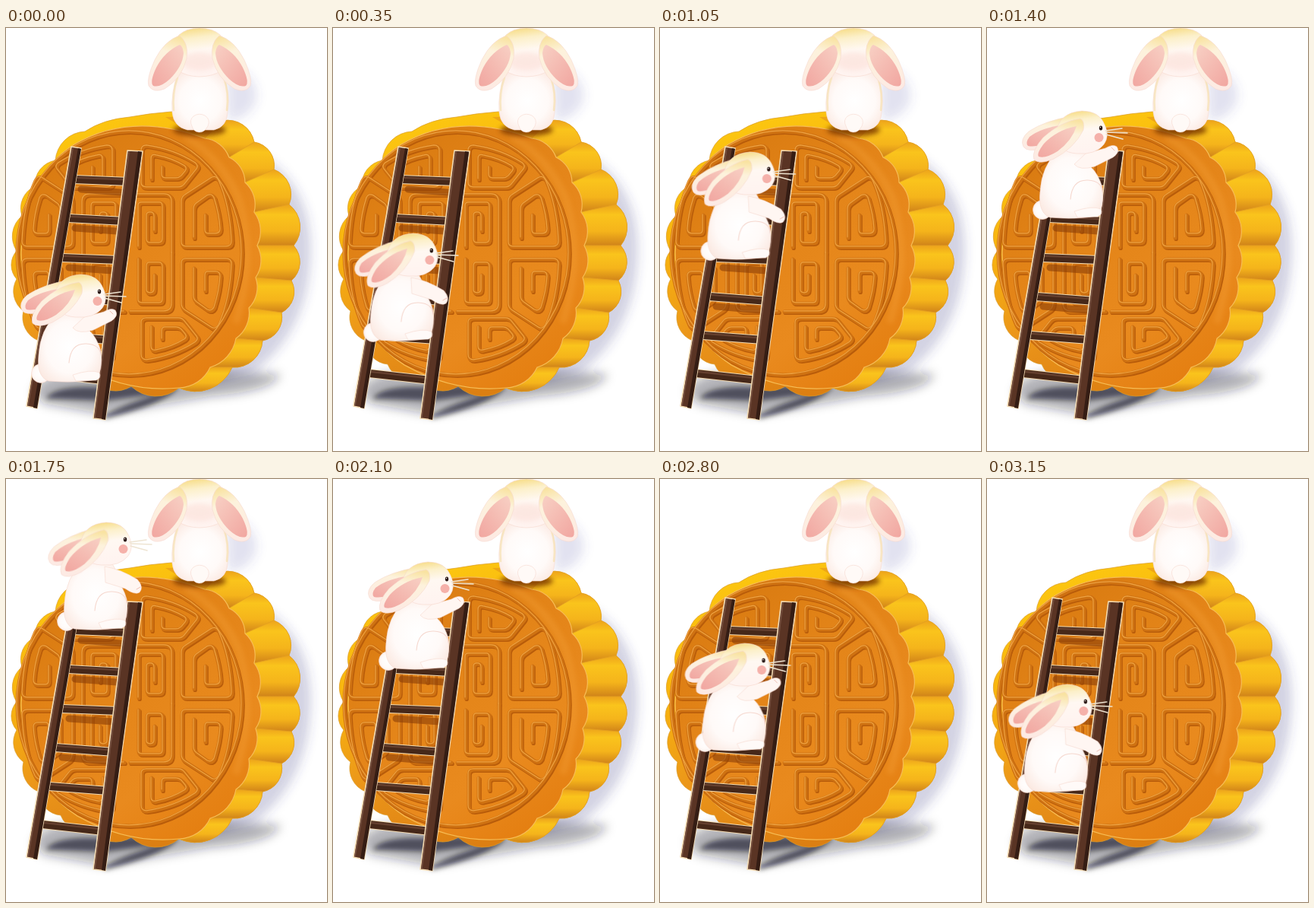
An HTML page that plays this animation: 423 px wide and 556 px high, repeating every 3.5 s.

```html
<!DOCTYPE html>
<html lang="en">
<head>
<meta charset="utf-8">
<title>Rabbit climbing a mooncake</title>
<style>
  html, body { margin: 0; width: 100%; height: 100%; overflow: hidden; background: #fff; }
  svg { display: block; width: 423px; height: 556px; }
  .line { fill: none; stroke-linecap: round; stroke-linejoin: round; }
  .fur { stroke: #f6d9ce; stroke-width: .6; }
  .climber { animation: climb 3500ms step-end infinite; }
  .reach { animation: reach 700ms step-end infinite; }
  .rest { animation: rest 700ms step-end infinite; }
  .ears { transform-origin: 90px 342px; animation: droop 700ms step-end infinite; }
  @keyframes climb {
    0%, 100% { transform: translate(0, 0); }
    10%, 90% { transform: translate(6.8px, -54px); }
    20%, 80% { transform: translate(13.5px, -108px); }
    30%, 70% { transform: translate(20.3px, -161px); }
    40%, 60% { transform: translate(27px, -215px); }
    50% { transform: translate(34px, -267px); }
  }
  @keyframes reach { 0% { visibility: visible; } 50%, 100% { visibility: hidden; } }
  @keyframes rest { 0% { visibility: hidden; } 50%, 100% { visibility: visible; } }
  @keyframes droop { 0% { transform: rotate(0deg); } 50%, 100% { transform: rotate(-5deg); } }
</style>
</head>
<body>
<svg viewBox="0 0 423 556">
  <defs>
    <linearGradient id="rim" x1=".1" y1="0" x2=".45" y2="1">
      <stop offset="0" stop-color="#fdcb10"/><stop offset=".4" stop-color="#f8b40f"/>
      <stop offset=".7" stop-color="#eb951a"/><stop offset="1" stop-color="#dc7f12"/>
    </linearGradient>
    <linearGradient id="band" x1=".1" y1="0" x2=".1" y2="1">
      <stop offset="0" stop-color="#eda31b"/><stop offset=".25" stop-color="#fac41c"/>
      <stop offset=".65" stop-color="#f5b41b"/><stop offset="1" stop-color="#d08319"/>
    </linearGradient>
    <linearGradient id="face" x1=".1" y1="0" x2=".75" y2="1">
      <stop offset="0" stop-color="#d6780f"/><stop offset=".4" stop-color="#e38418"/>
      <stop offset=".75" stop-color="#e98a1e"/><stop offset="1" stop-color="#e47e10"/>
    </linearGradient>
    <linearGradient id="head" x1=".4" y1="0" x2=".55" y2="1">
      <stop offset="0" stop-color="#f7dd88"/><stop offset=".2" stop-color="#fcf0ca"/>
      <stop offset=".45" stop-color="#fff8f2"/><stop offset="1" stop-color="#fff3f0"/>
    </linearGradient>
    <radialGradient id="body" cx=".5" cy=".5" r=".62">
      <stop offset="0" stop-color="#fff"/><stop offset=".6" stop-color="#fffaf8"/>
      <stop offset="1" stop-color="#fbe8e0"/>
    </radialGradient>
    <linearGradient id="ear" x1=".6" y1="0" x2=".4" y2="1">
      <stop offset="0" stop-color="#f9e3a2"/><stop offset=".3" stop-color="#fdf2dc"/>
      <stop offset="1" stop-color="#fdeae4"/>
    </linearGradient>
    <linearGradient id="pink" x1="1" y1="0" x2="0" y2="1">
      <stop offset="0" stop-color="#f8d0c4"/><stop offset="1" stop-color="#f1a6a0"/>
    </linearGradient>
    <filter id="soft" x="-40%" y="-40%" width="180%" height="180%"><feGaussianBlur stdDeviation="7"/></filter>
    <filter id="blur" x="-30%" y="-60%" width="160%" height="220%"><feGaussianBlur stdDeviation="3"/></filter>

    <!-- one quarter of the relief, measured from its centre -->
    <g id="quarter">
      <path d="M4 77H49Q59 77 59 67V0"/>
      <path d="M15 8V62Q15 66 20 66H43Q47 66 47 61V18Q47 13 42 13H30Q26 13 26 18V49Q26 53 31 53Q36 53 36 48V29"/>
      <path d="M78 8H131Q138 8 138 15Q136 62 121 95Q117 102 111 98L77 76Q72 73 72 67V14Q72 8 78 8Z"/>
      <path d="M88 20V57Q88 62 92 65L106 75Q112 78 115 72Q122 50 123 31Q123 25 117 25H107Q103 25 103 30V50"/>
      <path d="M26 86H68Q73 86 76 90L92 110Q95 114 90 118Q62 136 26 141Q19 141 19 134V92Q19 86 26 86Z"/>
      <path d="M32 97V123Q32 130 39 128Q60 124 76 114Q80 111 77 107L72 101Q69 98 65 98H51Q46 98 46 103V113"/>
    </g>
    <g id="relief">
      <use href="#quarter"/>
      <use href="#quarter" transform="scale(-1 1)"/>
      <use href="#quarter" transform="scale(1 -1)"/>
      <use href="#quarter" transform="scale(-1 -1)"/>
      <ellipse cx="3" rx="148" ry="160"/>
    </g>
    <path id="rungs" d="M90 199L163 202M82 250L156 254M74 302L149 305M65 353L142 359M57 404L135 410M48 454L128 463"/>
    <path id="rails" d="M86 156L99 158L41 500L27 497ZM160 161L180 162L131 515L115 513Z"/>
  </defs>

  <!-- ground and wall shadows -->
  <g filter="url(#soft)">
    <path d="M340 170Q412 215 400 320Q392 400 330 450L250 475Q350 400 360 280Z" fill="#3c4488" opacity=".23"/>
    <path d="M290 45Q334 62 330 95Q320 120 292 122Z" fill="#4a52a0" opacity=".16"/>
    <path d="M36 480Q44 445 130 455L280 450L362 455Q352 478 270 484L130 508L50 494Z" fill="#14142a" opacity=".34"/>
  </g>
  <g filter="url(#blur)" fill="#07070f">
    <path d="M52 487Q66 470 118 472L212 468Q246 474 200 481L130 490Z" opacity=".55"/>
    <path d="M128 510Q158 492 224 476Q204 495 132 513Z" opacity=".6"/>
  </g>

  <path id="rimShape" fill="url(#rim)" stroke="#d99b2a" stroke-width=".7"/>
  <path d="M210 117Q252 115 288 126Q312 138 326 153L298 175L262 148Z" fill="#eda616"/>
  <g id="bands"></g>
  <path id="faceShape" fill="url(#face)" stroke="#f7bd55" stroke-width="1.2"/>
  <path d="M238 144Q284 171 307 225Q329 300 304 384" class="line" stroke="#f8a63c" stroke-width="9" opacity=".3" filter="url(#blur)"/>

  <g transform="translate(160 296)" class="line">
    <use href="#relief" x="1.2" y="1.5" stroke="#b85c0a" stroke-width="5.2"/>
    <use href="#relief" stroke="#cf7212" stroke-width="5"/>
    <use href="#relief" x="-1" y="-1.2" stroke="#efa341" stroke-width="1.2"/>
  </g>

  <!-- ladder -->
  <g class="line" stroke="#8b3f08" stroke-width="9" opacity=".6">
    <path d="M99 212L151 216M91 263L146 267M83 315L140 319M74 366L132 371"/>
  </g>
  <use href="#rungs" class="line" stroke="#f4dcb4" stroke-width="12"/>
  <use href="#rungs" class="line" stroke="#462819" stroke-width="10"/>
  <use href="#rungs" class="line" y="-2.5" stroke="#65402f" stroke-width="2.5"/>
  <use href="#rails" fill="#5a3424" stroke="#f4dcb4" stroke-width="1.6" stroke-linejoin="round"/>
  <path d="M95 158L99 159L41 500L36 499ZM174 162L179 163L131 515L126 514Z" fill="#351d14"/>
  <path d="M88 158L29 496M162 163L117 512" class="line" stroke="#755040" stroke-width="1.6"/>

  <!-- rabbit sitting on top -->
  <ellipse cx="255" cy="134" rx="35" ry="8" fill="#7b3905" opacity=".85" filter="url(#blur)"/>
  <path class="fur" fill="url(#body)" d="M227 57Q217 85 219 111Q221 130 239 134H274Q291 130 292 111Q297 82 283 57Z"/>
  <path d="M226 65Q219 85 221 108M287 65Q294 85 291 108" class="line" stroke="#f6dfa8" stroke-width="2.5" opacity=".6"/>
  <path class="fur" fill="url(#head)" d="M218 35Q219 1 255 0Q291 1 293 35Q292 63 255 64Q219 63 218 35Z"/>
  <ellipse cx="255" cy="44" rx="24" ry="12" fill="#f9cfc6" opacity=".35" filter="url(#blur)"/>
  <g id="lop">
    <path class="fur" fill="url(#ear)" d="M229 10Q209 16 196 42Q185 66 188 76Q194 86 209 80Q232 66 238 40Q241 20 229 10Z"/>
    <path fill="url(#pink)" d="M229 22Q209 31 198 52Q189 71 194 76Q203 79 216 67Q233 50 234 33Q233 24 229 22Z"/>
  </g>
  <use href="#lop" transform="matrix(-1 0 0 1 510 0)"/>
  <path class="fur" fill="#fffaf7" d="M245 129Q241 121 247 116Q254 111 262 115Q270 120 266 129Q261 138 254 137Q247 136 245 129Z"/>

  <!-- climbing rabbit -->
  <g class="climber">
    <circle class="fur" cx="46" cy="454" r="12.5" fill="url(#body)"/>
    <path class="fur" fill="url(#body)" d="M67 376Q45 396 43 430Q40 458 56 464Q90 467 118 462Q128 451 125 425Q120 407 110 398Q114 384 101 374Z"/>
    <path d="M83 440Q85 414 106 415Q124 416 125 430M94 459Q108 450 119 454" class="line" stroke="#f6d8cf" stroke-width="1.1"/>
    <path class="fur" fill="#fffaf8" d="M88 456Q112 448 123 453Q126 460 119 463L92 464Z"/>
    <g class="reach">
      <path class="fur" fill="#fff6f2" d="M88 394Q95 403 115 397L139 385Q149 378 144 371Q139 367 129 373L103 380Z"/>
      <path d="M137 372L141 376" class="line" stroke="#f0beb2"/>
    </g>
    <g class="rest">
      <path class="fur" fill="#fff6f2" d="M96 382Q116 385 139 399Q148 409 142 416Q136 420 123 411L97 403Z"/>
      <path d="M138 412L143 409" class="line" stroke="#f0beb2"/>
    </g>
    <g class="ears">
      <path class="fur" fill="url(#ear)" d="M84 331Q49 337 28 351Q16 361 21 371Q26 379 48 373Q76 364 88 347Z"/>
      <path fill="url(#pink)" d="M74 342Q45 346 29 358Q23 366 27 370Q40 373 60 361Z"/>
    </g>
    <path class="fur" fill="url(#head)" d="M64 353Q68 326 98 324Q121 324 128 342Q135 357 127 368Q116 382 92 380Q66 379 64 353Z"/>
    <g class="ears">
      <path class="fur" fill="url(#ear)" d="M96 334Q70 338 47 359Q31 377 35 388Q42 395 61 387Q88 373 100 349Q102 337 96 334Z"/>
      <path fill="url(#pink)" d="M91 344Q65 349 48 367Q38 380 41 384Q50 387 66 377Q85 363 91 344Z"/>
    </g>
    <ellipse cx="123" cy="346.500" rx="2.200" ry="2.900" fill="#2a1714"/>
    <circle cx="122.500" cy="345.500" r=".7" fill="#fff"/>
    <circle cx="120.500" cy="359" r="6" fill="#f3a59d" opacity=".85"/>
    <path d="M130 352L158 353M130 355L152 361M129 350L151 347" class="line" stroke="#eee4d2" stroke-width="1.5"/>
  </g>
</svg>
<script>
  // notches of the scalloped edges, clockwise from the top
  const back = [[285, 122], [327, 150], [353, 186], [373, 232], [379, 286], [376, 332], [363, 374], [338, 411], [298, 446], [228, 473]];
  const front = [[262, 145], [294, 170], [315, 203], [327, 242], [331, 286], [329, 328], [320, 368], [303, 408], [269, 446], [228, 473]];
  const left = [[165, 471], [115, 463], [72, 442], [43, 411], [23, 372], [14, 330], [14, 293], [21, 247], [38, 208], [65, 174], [104, 136]];

  // arcs between neighbouring notches; a larger ratio makes flatter lobes
  const edge = (points, ratio) => points.slice(1).map(([u, v], i) => {
    const [x, y] = points[i];
    const r = Math.hypot(u - x, v - y) * ratio;
    return `A${r} ${r} 0 0 1 ${u} ${v}`;
  }).join('');
  const put = (id, d) => document.getElementById(id).setAttribute('d', d);

  const last = back[back.length - 1];
  put('rimShape', `M${back[0]}${edge(back, .7)}${edge([last, ...left], .75)}Q128 120 163 117Q190 112 218 110Z`);
  put('faceShape', `M${front[0]}${edge(front, .95)}Q160 480 94 443Q20 394 20 295Q23 195 90 153Q165 109 262 145Z`);

  let html = '';
  for (let i = 0; i < back.length - 1; i++) {
    const d = `M${front[i]}L${back[i]}${edge([back[i], back[i + 1]], .7)}L${front[i + 1]}Z`;
    html += `<path d="${d}" fill="url(#band)" stroke="#e3a022" stroke-width=".7"/>`;
  }
  document.getElementById('bands').innerHTML = html;
</script>
</body>
</html>
```
